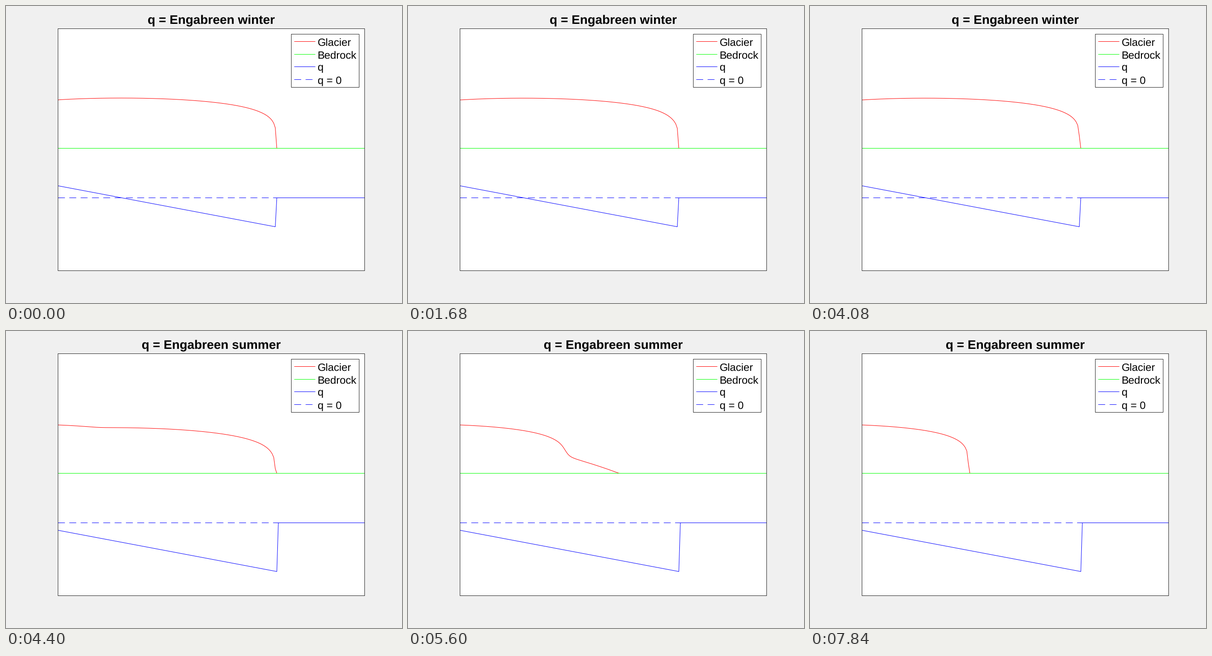
A matplotlib script that plays this animation: 864x648 px, repeating every 8000 ms.

```python
import numpy as np
import matplotlib
import matplotlib.pyplot as plt
from matplotlib.animation import FuncAnimation
from matplotlib.patches import Rectangle

matplotlib.rcParams["font.family"] = "Liberation Sans"
matplotlib.rcParams["text.hinting"] = "none"
matplotlib.rcParams["path.snap"] = False

W, H = 864, 648
FRAMES, INTERVAL = 100, 80
LEFT, RIGHT, TOP, BOTTOM = 113.5, 782.5, 49.5, 577.5
BED, ZERO = 310.5, 418.5          # pixel rows of bedrock and q = 0
RED, GREEN, BLUE, EDGE = "#ff0000", "#00ff00", "#0000ff", "#262626"

# Ice thickness h obeys h_t + (K h^5)_x = q, all lengths in pixels
N = 200
x = np.linspace(LEFT, RIGHT, N)
dx = x[1] - x[0]
SLOPE = 0.1885
q_winter = 26.2 - SLOPE * (x - LEFT)
q_summer = -16.3 - SLOPE * (x - LEFT)
TIP = 141                         # last node with ice in winter
H0 = 105.5                        # fixed thickness at the left edge
RATE, SUBSTEPS = 0.079, 30        # model time per frame
SUMMER = 52                       # step at which the season turns
LAST = FRAMES - 3


def simulate():
    gain = np.concatenate([[0], np.cumsum(q_winter[1:] * dx)])
    flux0 = 3 - gain[TIP]
    k = flux0 / H0**5
    # Winter balance with a slight surplus that drains off to the right
    flux = flux0 + gain + 120
    flux[0] = flux0
    flux[TIP + 1:] = 0
    h = (flux / k) ** 0.2
    states = [h.copy()]
    dt = RATE / SUBSTEPS
    for step in range(1, LAST + 1):
        q = q_summer if step >= SUMMER else q_winter
        for _ in range(SUBSTEPS):
            flow = k * h**5
            h[1:] = np.maximum(h[1:] + dt * (q[1:] - np.diff(flow) / dx), 0)
        states.append(h.copy())
    return states


def masked(q, tip):
    return ZERO - np.where(np.arange(N) <= tip, q, 0)


states = simulate()
balance = {"winter": masked(q_winter, TIP), "summer": masked(q_summer, TIP + 1)}

fig = plt.figure(figsize=(W / 72, H / 72), dpi=72, facecolor="#f0f0f0")
ax = fig.add_axes([0, 0, 1, 1])
ax.set_xlim(0, W)
ax.set_ylim(H, 0)
ax.axis("off")


def box(x0, y0, x1, y1, z, fill="white"):
    ax.add_patch(Rectangle((x0, y0), x1 - x0, y1 - y0, facecolor=fill,
                           edgecolor=EDGE, lw=1, zorder=z, snap=False))


def line(xs, ys, color, z, style="-"):
    return ax.plot(xs, ys, color=color, lw=1, ls=style, zorder=z, snap=False,
                   dash_capstyle="butt", solid_capstyle="butt")[0]


DASH = (0, (15, 9.7))
box(LEFT, TOP, RIGHT, BOTTOM, 0)
glacier = line(x, BED - states[0], RED, 1)
line([LEFT, RIGHT], [BED, BED], GREEN, 2)
q_line = line(x, balance["winter"], BLUE, 3)
line([LEFT, RIGHT], [ZERO, ZERO], BLUE, 3, DASH)
box(LEFT, TOP, RIGHT, BOTTOM, 4, "none")

box(622.5, 61.5, 770.5, 177.5, 5)
legend = [("Glacier", RED, "-"), ("Bedrock", GREEN, "-"),
          ("q", BLUE, "-"), ("q = 0", BLUE, DASH)]
for row, (name, color, style) in enumerate(legend):
    y = 77.5 + round(27.6 * row)
    line([629, 675], [y, y], color, 6, style)
    ax.text(679.5, y + 9, name, size=23.2, va="baseline", zorder=6)

title = ax.text(447.5, 39.5, "", size=27.4, weight="bold",
                ha="center", va="baseline")


def update(i):
    step = min(max(i - 1, 0), LAST)
    season = "summer" if step >= SUMMER else "winter"
    glacier.set_ydata(BED - states[step])
    q_line.set_ydata(balance[season])
    title.set_text(f"q = Engabreen {season}")
    return glacier, q_line, title


anim = FuncAnimation(fig, update, frames=FRAMES, interval=INTERVAL,
                     repeat=True, repeat_delay=0)
plt.show()
```
